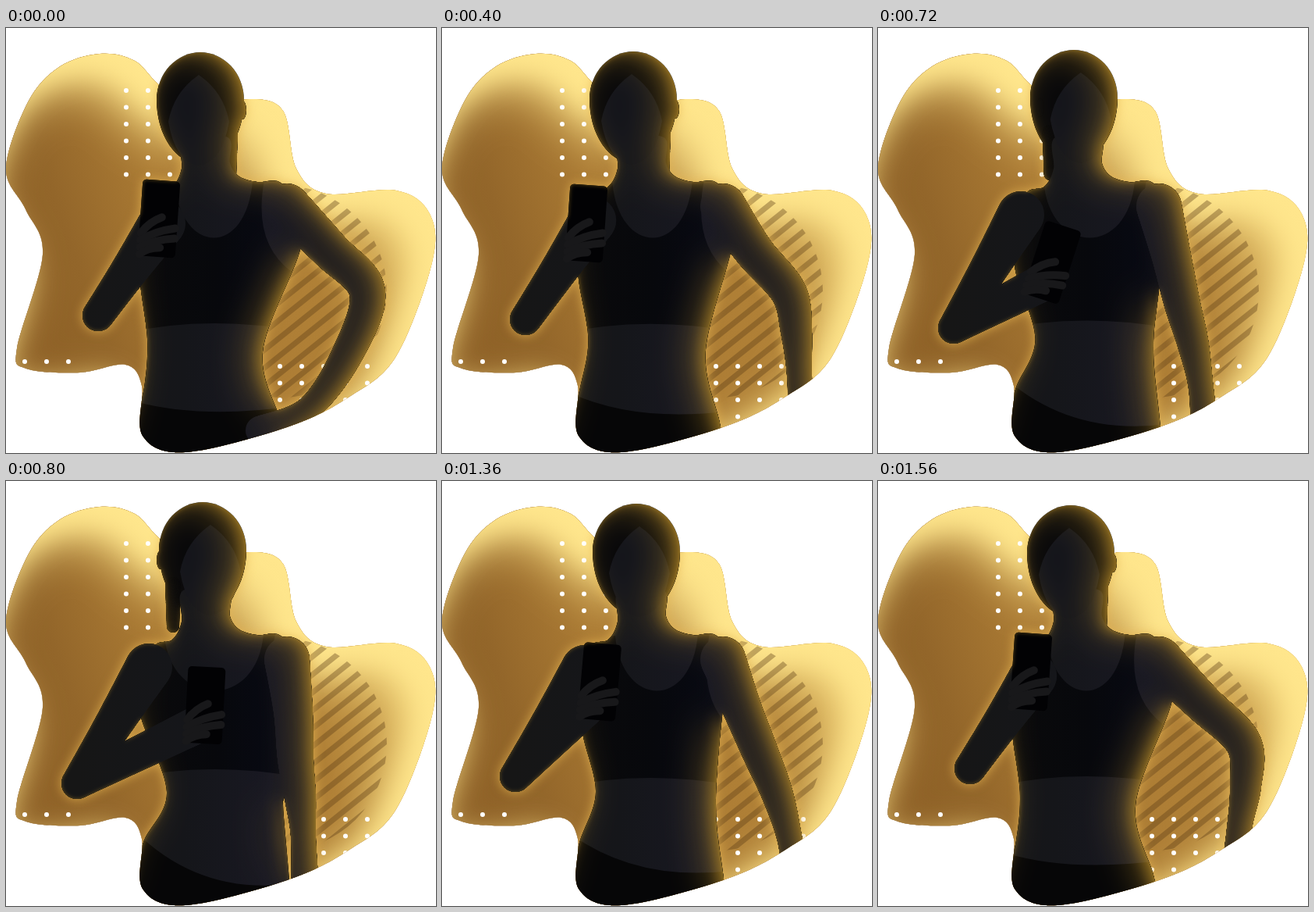
An HTML page with a canvas that plays this animation: 551 px wide and 544 px high, repeating every 1680 ms.

```html
<!DOCTYPE html>
<html lang="en">
<head>
<meta charset="utf-8">
<title>Silhouette</title>
<style>
  html, body { margin: 0; width: 100%; height: 100%; overflow: hidden; background: #fff; }
  canvas { display: block; width: 100vw; height: 100vh; }
</style>
</head>
<body>
<canvas id="stage" width="551" height="544"></canvas>
<script>
const W = 551, H = 544, LOOP = 1680;

// Three key stances; all others lie between them.
// head: centre and turn; hand: phone centre and tilt; arm: joints below the shoulder.
const onHip = {
  head: [249, 92, -1], hand: [196, 244, 4], elbow: [118, 368], shoulder: [200, 250],
  bust: [171, 315], waist: [181, 329], armpit: [377, 284], hip: [354],
  neck: [216, 316], hem: [387], belt: [478, 501, 484],
  arm: [415, 284, 463, 338, 437, 418, 388, 487, 325, 515]
};
const lowered = {
  head: [249, 90, 0], hand: [202, 257, 5], elbow: [94, 378], shoulder: [183, 240],
  bust: [180, 322], waist: [197, 351], armpit: [361, 285], hip: [361],
  neck: [222, 328], hem: [389], belt: [452, 513, 499],
  arm: [384, 290, 408, 348, 430, 402, 446, 460, 455, 520]
};
const upright = {
  head: [252, 88, 1], hand: [255, 287, 3], elbow: [91, 387], shoulder: [183, 238],
  bust: [172, 299], waist: [206, 355], armpit: [358, 395], hip: [363],
  neck: [203, 330], hem: [378], belt: [448, 532, 515],
  arm: [368, 295, 371, 355, 377, 405, 381, 455, 383, 520]
};

const mix = (a, b, t) => a.map((v, i) => v + (b[i] - v) * t);

function between(a, b, t, changes) {
  const pose = {};
  for (const part in a) pose[part] = mix(a[part], b[part], t);
  return { ...pose, ...changes };
}

const released = between(onHip, lowered, .05, {
  head: [247, 92, -1], hand: onHip.hand, elbow: onHip.elbow,
  arm: [415, 283, 468, 335, 471, 390, 463, 445, 455, 520]
});
const swinging = between(onHip, lowered, .4, {
  head: [245, 91, -1], hand: [185, 250, 4], elbow: [107, 373],
  arm: [400, 286, 444, 338, 454, 388, 458, 445, 462, 520]
});
const lowering = between(swinging, lowered, .5);
const turning = between(lowered, upright, .5, {
  head: [251, 89, .8], hand: [223, 300, 18], elbow: [97, 384]
});

// Each pose holds until its end time, in ms.
const timeline = [
  [320, onHip], [400, released], [520, swinging], [600, lowering], [720, lowered],
  [800, turning], [1280, upright], [1360, turning], [1480, lowered],
  [1560, swinging], [LOOP, released]
];

// Closed smooth curve through x, y pairs.
function outline(...pts) {
  const path = new Path2D(), n = pts.length / 2;
  const at = i => pts.slice(2 * ((i + n) % n), 2 * ((i + n) % n) + 2);
  path.moveTo(...at(0));
  for (let i = 0; i < n; i++) {
    const [a, b, c, d] = [at(i - 1), at(i), at(i + 1), at(i + 2)];
    path.bezierCurveTo(
      b[0] + (c[0] - a[0]) / 6, b[1] + (c[1] - a[1]) / 6,
      c[0] - (d[0] - b[0]) / 6, c[1] - (d[1] - b[1]) / 6, c[0], c[1]);
  }
  path.closePath();
  return path;
}

// Smooth tapered limb through joints, one radius per joint.
function limb(g, fill, radii, ...xy) {
  const joints = radii.map((r, i) => [xy[2 * i], xy[2 * i + 1], r]);
  const at = i => joints[Math.min(joints.length - 1, Math.max(0, i))];
  const steps = 48;
  g.fillStyle = fill;
  for (let s = 0; s <= (joints.length - 1) * steps; s++) {
    const i = Math.floor(s / steps), t = s / steps - i;
    const [a, b, c, d] = [at(i - 1), at(i), at(i + 1), at(i + 2)];
    const [x, y, r] = b.map((v, k) => v + t / 2 * (c[k] - a[k] +
      t * (2 * a[k] - 5 * v + 4 * c[k] - d[k] + t * (3 * (v - c[k]) + d[k] - a[k]))));
    g.beginPath();
    g.arc(x, y, r, 0, 7);
    g.fill();
  }
}

function layer() {
  const c = document.createElement('canvas');
  c.width = W;
  c.height = H;
  return c.getContext('2d');
}

function gradient(g, x0, y0, x1, y1, ...stops) {
  const fill = g.createLinearGradient(x0, y0, x1, y1);
  stops.forEach(([at, colour]) => fill.addColorStop(at, colour));
  return fill;
}

function paint(g, path, fill) {
  g.fillStyle = fill;
  g.fill(path);
}

const blob = outline(
  0,180, 28,95, 68,50, 120,33, 165,42, 200,76, 255,105, 312,91, 355,106, 372,180, 410,212, 500,208, 543,238,
  546,300, 500,420, 440,472, 360,511, 230,543, 175,522, 174,458, 153,431, 95,441, 26,436, 14,410, 47,290, 25,232);

// The head may rise above the blob; the rest stays inside it.
const frame = new Path2D(blob);
frame.rect(180, 0, 132, 200);

function drawDots(g, x0, y0, cols, rows) {
  g.fillStyle = '#fff';
  for (let i = 0; i < cols * rows; i++) {
    g.beginPath();
    g.arc(x0 + (i % cols) * 28, y0 + Math.floor(i / cols) * 21.5, 3, 0, 7);
    g.fill();
  }
}

function drawStripes(g) {
  const slope = .8;
  g.save();
  g.beginPath();
  g.arc(352, 337, 136, 0, 7);
  g.clip();
  g.strokeStyle = 'rgba(92,62,22,.38)';
  g.lineWidth = 7;
  for (let y = 401; y < 900; y += 23) {
    g.beginPath();
    g.moveTo(200, y - slope * 200);
    g.lineTo(500, y - slope * 500);
    g.stroke();
  }
  g.restore();
}

function makeBackdrop() {
  const g = layer();
  g.fillStyle = '#fff';
  g.fillRect(0, 0, W, H);
  g.clip(blob);
  g.fillStyle = gradient(g, 0, 390, 551, 200, [0, '#8b5d24'], [.2, '#93662a'], [.42, '#ab7b34'], [.68, '#b08036'], [1, '#e3bd63']);
  g.fillRect(0, 0, W, H);

  // Light falls inwards from the upper right edge.
  const outside = new Path2D();
  outside.rect(-200, -200, W + 400, H + 400);
  outside.addPath(blob);
  g.save();
  g.shadowColor = '#ffe68c';
  for (const [shift, blur] of [[38, 64], [20, 36]]) {
    g.shadowOffsetX = -shift;
    g.shadowOffsetY = shift;
    g.shadowBlur = blur;
    g.fill(outside, 'evenodd');
  }
  g.restore();

  const shine = g.createRadialGradient(335, 130, 10, 335, 130, 120);
  shine.addColorStop(0, 'rgba(255,230,140,.6)');
  shine.addColorStop(1, 'rgba(255,230,140,0)');
  g.fillStyle = shine;
  g.fillRect(0, 0, W, H);

  drawStripes(g);
  drawDots(g, 154, 80, 3, 6);
  drawDots(g, 24, 427, 3, 1);
  drawDots(g, 351, 433, 5, 4);
  return g.canvas;
}

// Gold light along the inner edge of whatever the layer holds.
function addGlow(g, passes) {
  const mask = layer();
  mask.fillRect(0, 0, W, H);
  mask.globalCompositeOperation = 'destination-out';
  mask.drawImage(g.canvas, 0, 0);
  g.save();
  g.globalCompositeOperation = 'source-atop';
  for (const [dx, blur, alpha] of passes) {
    g.shadowColor = `rgba(196,148,40,${alpha})`;
    g.shadowOffsetX = dx;
    g.shadowBlur = blur;
    g.drawImage(mask.canvas, 0, 0);
  }
  g.restore();
}

function torsoPath({ bust, waist, armpit, hip }) {
  return outline(
    227,140, 225,180, 213,203, 190,212, 176,260, ...bust, waist[0],398, 177,460, 165,505, 160,570,
    hip[0] + 4,570, hip[0],510, waist[1],415, ...armpit, 375,235, 352,198, 322,197, 299,190, 287,173, 284,140);
}

function drawHair(g, [x, y, turn]) {
  const hair = '#08080a';
  g.fillStyle = hair;
  g.beginPath();
  g.ellipse(x, y, 56, 61, 0, Math.PI, 0);
  g.ellipse(x, y, 56, 82, 0, 0, Math.PI);
  g.fill();
  g.beginPath();
  g.ellipse(x - 54 * turn, y + 13, 5, 12, 0, 0, 7);
  g.fill();
  limb(g, hair, [10, 8], x - 38 * turn, y + 45, x - 38 * turn, y + 98);
}

function drawFace(g, [x, y, turn]) {
  const mid = x + 4 + 6 * turn;
  const face = new Path2D();
  for (const side of [-1, 1]) {
    face.moveTo(mid, y - 32);
    face.quadraticCurveTo(mid + side * 32, y - 10, mid + side * 39, y + 28);
    face.quadraticCurveTo(mid + side * 30, y + 80, mid, y + 84);
  }
  paint(g, face, '#14151b');
}

function drawClothes(g, { neck: [left, right], hem: [hem], belt }, torso) {
  g.save();
  g.clip(torso);
  const top = new Path2D();
  top.moveTo(left, 198);
  top.bezierCurveTo(left + 8, 290, right - 8, 295, right, 195);
  top.lineTo(right + 15, 195);
  top.quadraticCurveTo(right, 275, 366, 312);
  top.lineTo(400, hem + 6);
  top.quadraticCurveTo(265, hem - 24, 140, hem + 6);
  top.lineTo(140, 198);
  paint(g, top, gradient(g, 170, 0, 370, 0, [0, '#0a0a0b'], [.5, '#07080c'], [1, '#080a15']));
  const pants = new Path2D();
  pants.moveTo(165, belt[0]);
  pants.quadraticCurveTo(250, belt[1], 370, belt[2]);
  pants.lineTo(380, 580);
  pants.lineTo(140, 580);
  paint(g, pants, '#060607');
  g.restore();
}

function drawPhone(g, [x, y, angle]) {
  g.save();
  g.translate(x, y);
  g.rotate(angle * Math.PI / 180);
  g.beginPath();
  g.roundRect(-24, -49, 48, 98, 5);
  g.fillStyle = '#020204';
  g.fill();
  g.strokeStyle = '#18181a';
  g.lineCap = 'round';
  g.lineWidth = 10;
  for (let i = 0; i < 4; i++) {
    const y0 = 20 + 9 * i, x1 = 24 - 9 * (i - 1.5) ** 2, y1 = 13 * i - 2;
    g.beginPath();
    g.moveTo(-22, y0);
    g.quadraticCurveTo(x1 / 2 - 14, (y0 + y1) / 2 - 4, x1, y1);
    g.stroke();
  }
  g.restore();
}

function makeFigure(pose) {
  const g = layer();
  const skin = gradient(g, 90, 0, 400, 0, [0, '#161616'], [.45, '#15161a'], [.8, '#181822'], [1, '#12131d']);
  const torso = torsoPath(pose);
  drawHair(g, pose.head);
  paint(g, torso, skin);
  drawClothes(g, pose, torso);
  limb(g, skin, [29, 25, 23, 20, 16, 18], 360, 228, ...pose.arm);
  drawFace(g, pose.head);
  addGlow(g, [[-18, 46, .42], [-7, 17, .55]]);

  const [x, y] = pose.hand, [ex, ey] = pose.elbow, [sx, sy] = pose.shoulder;
  const palm = [x - 8, y + 24];
  limb(g, skin, [30, 24, 20], sx, sy, (sx + ex) / 2, (sy + ey) / 2, ex, ey);
  limb(g, skin, [20, 22, 24], ex, ey, (palm[0] + ex) / 2, (palm[1] + ey) / 2, ...palm);
  drawPhone(g, pose.hand);
  addGlow(g, [[0, 5, .45]]);
  return g.canvas;
}

function makeScene(backdrop, pose) {
  const g = layer();
  const figure = makeFigure(pose);
  g.drawImage(backdrop, 0, 0);
  g.save();
  g.clip(blob);
  g.shadowColor = 'rgba(232,184,84,.8)';
  g.shadowBlur = 14;
  g.drawImage(figure, 0, 0);
  g.restore();
  g.clip(frame);
  g.drawImage(figure, 0, 0);
  return g.canvas;
}

const backdrop = makeBackdrop();
const scenes = new Map();
for (const [, pose] of timeline) {
  if (!scenes.has(pose)) scenes.set(pose, makeScene(backdrop, pose));
}

const ctx = document.getElementById('stage').getContext('2d');
const start = performance.now();

function draw() {
  const t = Math.max(0, performance.now() - start) % LOOP;
  const [, pose] = timeline.find(([end]) => t < end);
  ctx.drawImage(scenes.get(pose), 0, 0);
  requestAnimationFrame(draw);
}
draw();
</script>
</body>
</html>
```
